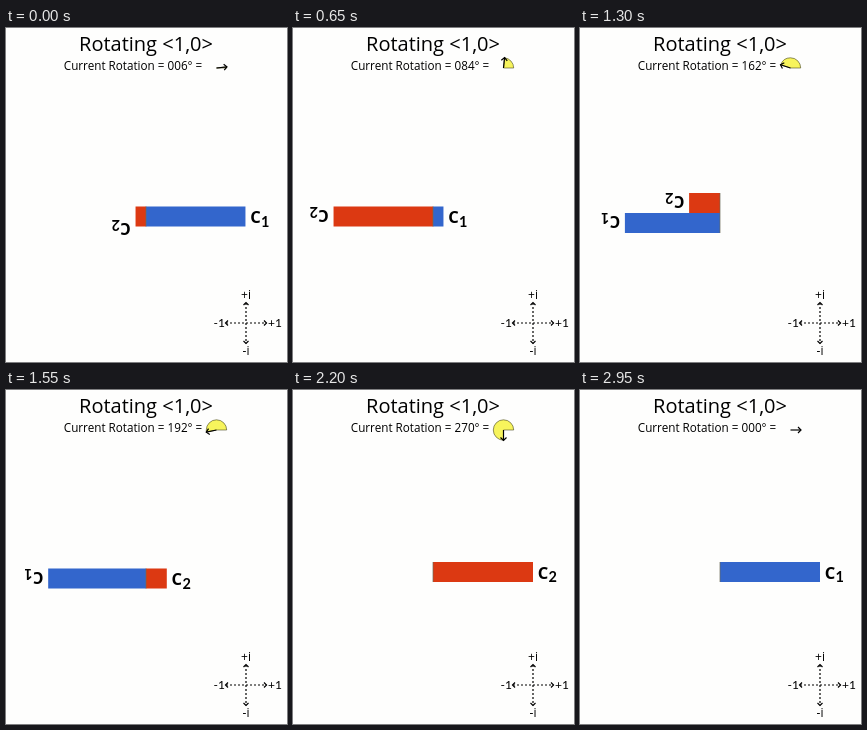
Recreate the animation shown at these times as an HTML page with a canvas. Size 281 by 334 pixels, loop 3 s.

```html
<!DOCTYPE html>
<html lang="en">
<head>
<meta charset="utf-8">
<title>Rotating a vector</title>
<style>
html, body { margin: 0; width: 100%; height: 100%; overflow: hidden; background: #fefefd; }
canvas { display: block; }
</style>
</head>
<body>
<canvas id="stage" width="281" height="334"></canvas>
<script>
const ctx = document.getElementById('stage').getContext('2d');
const LOOP = 3000, STEP = 50, TURN = 6;
const ORIGIN = 140, UNIT = 100, BAR = 20;
const BLUE = '#3366cc', RED = '#dc3912', INK = '#000', PAPER = '#fefefd';
const SANS = '"Open Sans", "Noto Sans", sans-serif';
const FOOTED = 'Lato, "Open Sans", sans-serif';

function text(str, x, y, font, align = 'left') {
  ctx.font = font;
  ctx.textAlign = align;
  ctx.fillStyle = INK;
  ctx.fillText(str, x, y);
}

// Straight arrow with an open head at its tip
function arrow(x, y, angle, length, head, dash = [], offset = 0) {
  ctx.save();
  ctx.translate(x, y);
  ctx.rotate(-angle);
  ctx.strokeStyle = INK;
  ctx.lineWidth = 1.2;
  ctx.setLineDash(dash);
  ctx.lineDashOffset = offset;
  ctx.beginPath();
  ctx.moveTo(0, 0);
  ctx.lineTo(length, 0);
  ctx.stroke();
  ctx.setLineDash([]);
  ctx.beginPath();
  ctx.moveTo(length - head, -head);
  ctx.lineTo(length, 0);
  ctx.lineTo(length - head, head);
  ctx.stroke();
  ctx.restore();
}

function drawDial(angle) {
  const x = 210.5, y = 40, r = 10.2;
  if (angle > 0) {
    ctx.beginPath();
    ctx.moveTo(x, y);
    ctx.arc(x, y, r, 0, -angle, true);
    ctx.closePath();
    ctx.fillStyle = '#f7f45c';
    ctx.fill();
    // Thin slices keep their pointed corner
    ctx.miterLimit = 20;
    ctx.strokeStyle = '#44441c';
    ctx.lineWidth = 0.6;
    ctx.stroke();
  }
  arrow(x, y, angle, 10.5, 3);
}

// The dashes run unbroken across the centre, so the far arms begin with a gap
function drawCompass() {
  const x = 240, y = 295;
  for (let i = 0; i < 4; i++) {
    const far = i === 1 || i === 2;
    arrow(x, y, i * Math.PI / 2, 20.5, 2.5, [2, 2], far ? 2 : 0);
  }
  text('+i', x, 271, '12px ' + SANS, 'center');
  text('-i', x, 327, '12px ' + SANS, 'center');
  text('-1', 219, 299, '12px ' + FOOTED, 'right');
  text('+1', 262, 299, '12px ' + FOOTED);
}

// Negative bars are the positive ones turned half a circle
function drawBar(value, index, color, mid) {
  const size = Math.abs(value) * UNIT;
  ctx.save();
  ctx.translate(ORIGIN, mid);
  if (value < 0) ctx.rotate(Math.PI);
  ctx.fillStyle = color;
  ctx.fillRect(0, -BAR / 2, size, BAR);
  // A short turned bar lets its label drop
  const drop = value < 0 && size < 12 ? -13 : 0;
  text('C', size + 4.7, 6.6 + drop, 'bold 16.5px ' + SANS);
  text(index, size + 15.6, 10 + drop, 'bold 14.5px ' + FOOTED);
  ctx.restore();
}

function drawBars(angle) {
  const bars = [
    { value: Math.cos(angle), index: '1', color: BLUE },
    { value: -Math.sin(angle), index: '2', color: RED }
  ].filter(b => Math.abs(b.value) > 1e-6);

  let top = 172, bottom = 192;
  if (bars.length === 1) {
    bars[0].mid = 182;
  } else if (bars[0].value * bars[1].value < 0) {
    bars[0].mid = bars[1].mid = 188.5;
    top = 178.5;
    bottom = 198.5;
  } else {
    const right = bars[0].value > 0;
    bars[0].mid = right ? 175 : 195;
    bars[1].mid = right ? 195 : 175;
    top = 165;
    bottom = 205;
  }
  for (const b of bars) drawBar(b.value, b.index, b.color, b.mid);
  ctx.fillStyle = 'rgba(110, 110, 90, 0.7)';
  ctx.fillRect(ORIGIN - 0.5, top, 1, bottom - top);
}

function draw(time) {
  const step = Math.floor((time % LOOP) / STEP);
  const degrees = (step + 1) * TURN % 360;
  const angle = degrees * Math.PI / 180;
  ctx.fillStyle = PAPER;
  ctx.fillRect(0, 0, 281, 334);
  text('Rotating <1,0>', 140, 23, '20px ' + SANS, 'center');
  text(`Current Rotation = ${String(degrees).padStart(3, '0')}° =`, 57.8, 42, '11.7px ' + SANS);
  drawDial(angle);
  drawBars(angle);
  drawCompass();
}

const start = performance.now();
function tick() {
  draw(performance.now() - start);
  requestAnimationFrame(tick);
}
tick();
</script>
</body>
</html>
```
